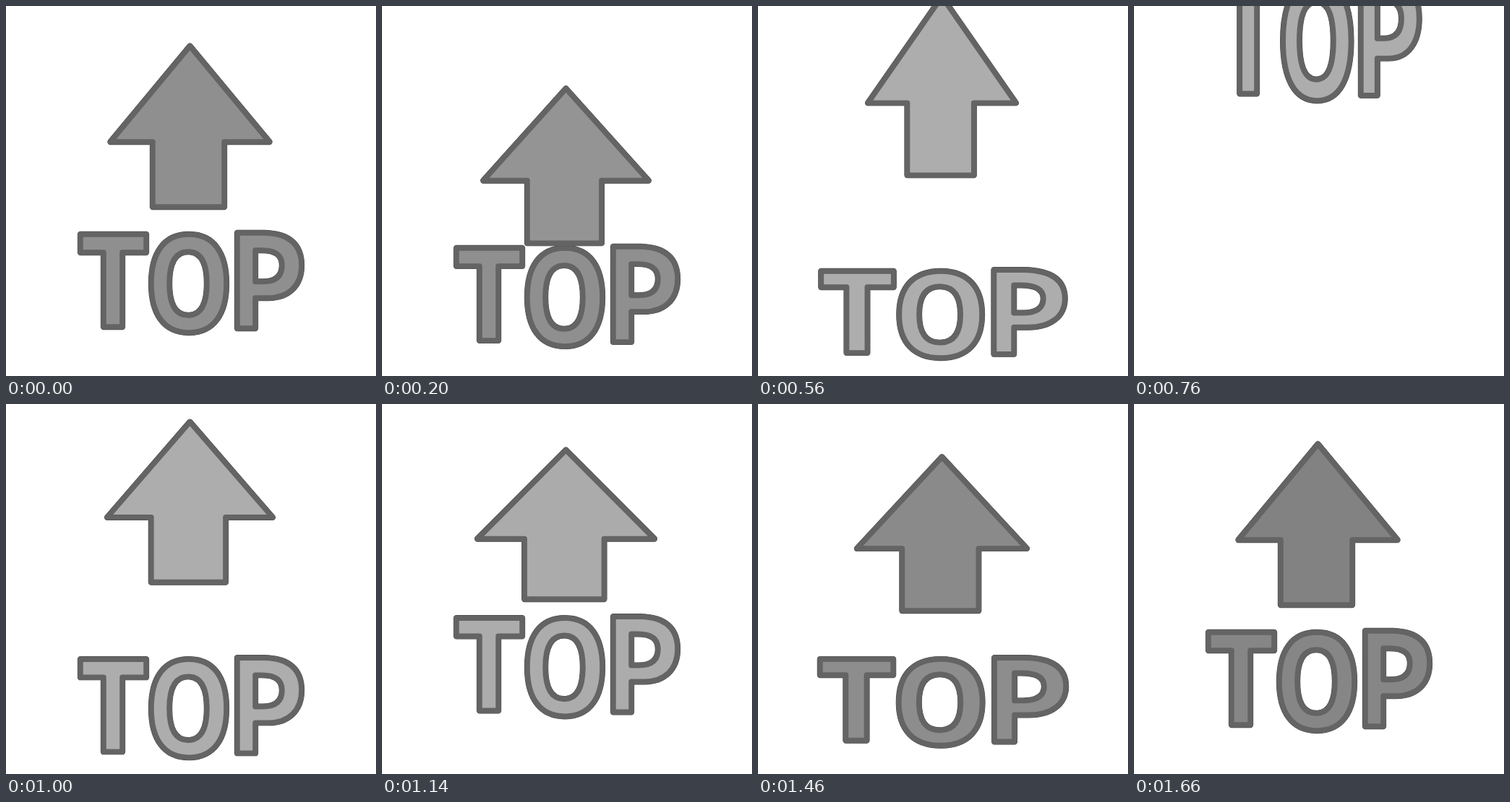
An HTML page for the animation above (2400 ms loop, 512x512 px).

```html
<!DOCTYPE html>
<html lang="en">
<head>
<meta charset="utf-8">
<title>Top</title>
<style>
html, body { margin: 0; width: 100%; height: 100%; overflow: hidden; background: #fff; }
svg { display: block; }
path { vector-effect: non-scaling-stroke; stroke-linejoin: round; fill-rule: evenodd; }
.edge { fill: none; stroke: #424242; stroke-width: 8.3px; }
.face { stroke: #646464; stroke-width: 7.5px; }
</style>
</head>
<body>
<svg width="512" height="512" role="img" aria-label="TOP">
  <defs>
    <path id="arrow" d="M254.5 55.5L364.5 188H302V278H203V188H144.5Z"/>
    <path id="word" d="M103 316H194V341H161V444H135V341H103Z
      M253 316C287 316 305 341 305 384S287 452 253 452S201 427 201 384S219 316 253 316Z
      M252 340C270 340 278 356 278 384S270 428 252 428S226 412 226 384S234 340 252 340Z
      M320 314H358C393 315 409 331 409 359C409 387 391 404 363 404H345V446H320Z
      M345 338H354C373 338 382 345 382 359C382 374 373 381.5 355 381.5H345Z"/>
  </defs>
  <g id="wordPose"><use href="#word" class="edge"/><use href="#word" class="face"/></g>
  <g id="arrowPose"><use href="#arrow" class="edge"/><use href="#arrow" class="face"/></g>
</svg>
<script>
const LOOP = 2400, STEP = 20, REST = 1620;

// Times: crouch = deepest squash, leap = leaves the floor, rise = comes back
// from below, calm = stretch fades, land = second squash builds up.
// crouchBy, flyBy and landBy are changes of [width, height].
const arrow = {
  id: "arrowPose", x: 254.5, home: 278, drop: 93, hop: 32, dip: 16, fade: 43,
  crouch: 380, leap: 436, rise: [800, 980], calm: [850, 1080], land: [700, 1300],
  crouchBy: [.25, -.245], flyBy: [-.1, .145], landBy: [.137, -.088]
};
const word = {
  id: "wordPose", x: 256, home: 452, drop: 35, hop: 25, dip: 27, fade: 39,
  crouch: 475, leap: 560, rise: [840, 1080], calm: [820, 1000], land: [1240, 1385],
  crouchBy: [.2, -.285], flyBy: [-.094, .22], landBy: [.147, -.16]
};

const portion = (t, a, b) => Math.min(1, Math.max(0, (t - a) / (b - a)));
const ramp = (t, a, b) => {
  const u = portion(t, a, b);
  return u * u * (3 - 2 * u);
};

function baseline(p, t) {
  const [start, top] = p.rise, low = p.land[1];
  if (t < start) {
    return p.home + p.drop * ramp(t, 0, 380) - .0089 * Math.max(0, t - p.leap) ** 2;
  }
  const below = 560 * (1 - portion(t, start, top)) ** 2;
  const sink = (p.hop + p.dip) * ramp(t, top, low);
  return p.home + below - p.hop + sink - p.dip * ramp(t, low, REST);
}

function pose(p, t) {
  const gather = ramp(t, p.crouch - 240, p.crouch);
  const launch = ramp(t, p.crouch, p.crouch + 220);
  const fly = launch - ramp(t, ...p.calm);
  const land = ramp(t, ...p.land) - ramp(t, p.land[1], REST);
  const [sx, sy] = [0, 1].map(i =>
    1 + p.crouchBy[i] * (gather - launch) + p.flyBy[i] * fly + p.landBy[i] * land);
  const grey = Math.round(143 + 30 * gather - p.fade * ramp(t, 1080, 1600));

  const g = document.getElementById(p.id);
  g.setAttribute("transform",
    `translate(${p.x} ${baseline(p, t)}) scale(${sx} ${sy}) translate(${-p.x} ${-p.home})`);
  g.setAttribute("fill", `rgb(${grey},${grey},${grey})`);
}

const start = performance.now();
function draw() {
  const t = Math.floor((performance.now() - start) % LOOP / STEP) * STEP;
  pose(word, t);
  pose(arrow, t);
  requestAnimationFrame(draw);
}
draw();
</script>
</body>
</html>
```
